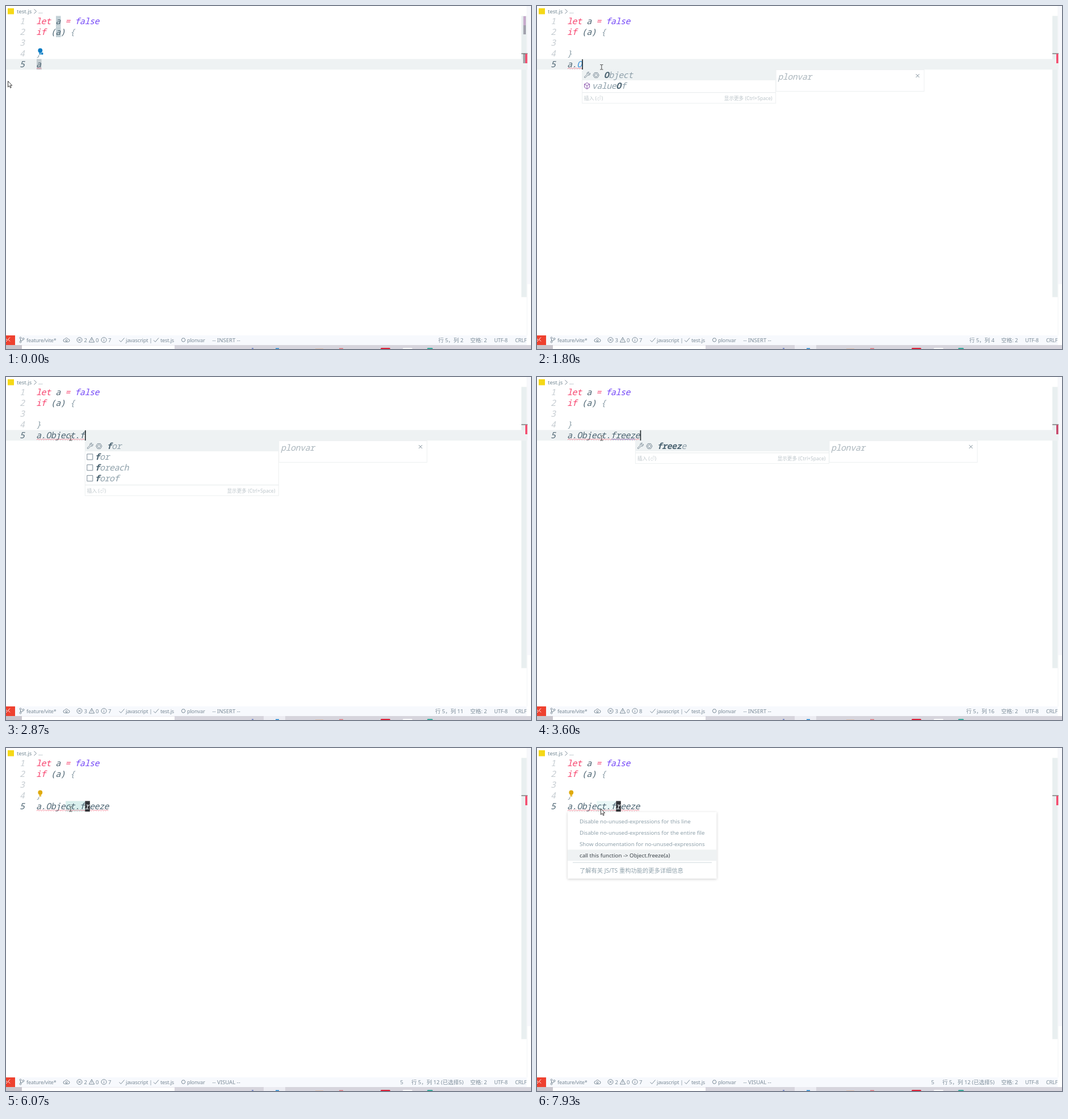
An HTML page for the animation above (8000 ms loop, 925 by 605 pixels).

```html
<!DOCTYPE html>
<html lang="zh">
<head>
<meta charset="utf-8">
<title>Editor quick fix</title>
<style>
html, body { margin: 0; width: 100%; height: 100%; overflow: hidden; background: #fff; }
svg { display: block; width: 925px; height: 605px; }
text { white-space: pre; fill: #8fa1ab; font: 9.5px "Noto Sans", "Noto Sans CJK SC", "Noto Sans CJK", sans-serif; }
.code { font: italic 15px "Noto Sans Mono", "DejaVu Sans Mono", monospace; letter-spacing: -.47px; fill: #4c6472; }
.kw { fill: #f7456f; }
.lit { fill: #7447f7; }
.dim { fill: #8fa1ab; }
.prop { fill: #3490dc; }
.bold { font-weight: 700; fill: #4c6472; }
.num { fill: #c6cdd2; }
.crumb { fill: #738893; }
.bar { fill: #7b8b97; font-size: 9.2px; letter-spacing: -.2px; }
.wide { fill: #7b8b97; }
.foot { font-size: 8.6px; fill: #bcc5ca; }
.menu { font-size: 9.68px; }
.line { fill: none; stroke: #7b8b97; stroke-width: 1; }
.shadow { filter: drop-shadow(0 1px 2px #0003); }
</style>
</head>
<body>
<svg viewBox="0 0 925 605">
  <!-- breadcrumb, scroll ruler and window edge -->
  <rect x="3" y="4" width="11" height="10.5" fill="#f5d816"/>
  <text class="crumb" x="19" y="13">test.js</text>
  <path class="line" d="M49.5 5.5l4 4-4 4"/>
  <text class="crumb" x="57" y="13">...</text>
  <rect x="908" y="17.5" width="9.5" height="496" fill="#e9eff0"/>
  <rect x="918.5" width="6.5" height="490.5" fill="#f7f8fc"/>
  <path d="M918 0V581" stroke="#eff1f4" stroke-width=".8"/>

  <g id="live"></g>

  <!-- status bar -->
  <rect y="581" width="925" height="17" fill="#f7f9fd"/>
  <rect y="581" width="16" height="17" fill="#ee412f"/>
  <path d="M-1 586l3.5 3.5-3.5 3.5M7 584.5l-3.5 3.5 3.5 3.5" fill="none" stroke="#fff"/>
  <g class="line">
    <circle cx="25.5" cy="585.5" r="1.5"/><circle cx="25.5" cy="592.5" r="1.5"/><circle cx="30.5" cy="587" r="1.5"/>
    <path d="M25.5 587v4M30.5 588.5q0 2-5 2"/>
    <path d="M103.5 592.5a2.5 2.5 0 0 1 0-5q3-4 6 0a2.5 2.5 0 0 1 0 5z"/><circle cx="106.5" cy="590" r="1.5"/>
    <circle cx="129.5" cy="589" r="4.5"/><path d="M127.5 587l4 4m0-4l-4 4"/>
    <path d="M151 584.5l4.7 8.5h-9.4zM151 587.5v3"/>
    <circle cx="172.5" cy="589" r="4.5"/><path d="M172.5 588.5v3m0-5v1"/>
    <path d="M199.5 589.5l3 3 6-7M260 589.5l3 3 6-7"/>
    <path d="M310.8 586h3.5l1.7 3-1.7 3h-3.5l-1.7-3z"/>
  </g>
  <text class="bar" x="36" y="592.5">feature/vite*</text>
  <text class="wide" x="158" y="592.5">0</text>
  <text class="bar" x="211" y="592.5">javascript |</text>
  <text class="bar" x="272" y="592.5">test.js</text>
  <text class="bar" x="319" y="592.5">plonvar</text>
  <text class="wide" x="818" y="592.5">空格: 2</text>
  <text class="bar" x="860" y="592.5">UTF-8</text>
  <text class="bar" x="897" y="592.5">CRLF</text>
  <rect x="917.5" y="581" width="7.5" height="17" fill="#fff"/>
  <g id="status"></g>

  <!-- top edge of the taskbar -->
  <rect y="598" width="925" height="7" fill="#d7d5dd"/>
  <rect y="598" width="28" height="7" fill="#c9c6cd"/>
  <rect x="28" y="598.5" width="269" height="6.5" fill="#fff"/>
  <rect id="focus" x="454" y="598" width="38" height="7" fill="#ececf2"/>
  <rect x="433" y="603" width="3" height="2" fill="#8090c8"/>
  <rect x="475" y="603.5" width="6" height="1.5" fill="#2389d4"/>
  <rect x="545" y="604" width="14" height="1" fill="#dcc0ae"/>
  <rect x="587" y="603.5" width="7" height="1.5" fill="#e0767d"/>
  <rect x="660" y="603" width="17" height="4" rx="1.5" fill="#dc1e36"/>
  <rect x="699" y="603" width="17" height="4" rx="1.5" fill="#fafafa"/>
  <rect x="742" y="603" width="10" height="4" rx="1.5" fill="#36aa9b"/>

  <path id="arrow" d="M.5.5v10.5l2.4-2.2 1.7 3.7 1.6-.7-1.7-3.6h3.2z" fill="#fff" stroke="#222" stroke-width=".9"/>
  <path id="beam" d="M111.2 103.5h1.8l.8.5.8-.5h1.8M113.8 104v7.5M111.2 112h1.8l.8-.5.8.5h1.8" fill="none" stroke="#333" stroke-width=".9"/>
</svg>
<script>
const LOOP = 8000, LEFT = 54, CW = 8.53, PITCH = 18.9;
const $ = id => document.getElementById(id);
const colX = n => LEFT + (n - 1) * CW;
const rect = (x, y, w, h, fill, more = '') => `<rect x="${x}" y="${y}" width="${w}" height="${h}" fill="${fill}" ${more}/>`;
const text = (x, y, s, cls = '', more = '') => `<text x="${x}" y="${y}" class="${cls}" ${more}>${s}</text>`;
// Slanted glyphs lean right, so code starts slightly left of its cell.
const code = (x, y, s, cls = '', more = '') => text(x - .9, y, s, 'code ' + cls, more);
const span = (cls, s) => `<tspan class="${cls}">${s}</tspan>`;
const path = (d, more = 'class="line"') => `<path d="${d}" ${more}/>`;

// A suggestion row: icon kind, label, bold range.
const row = (kind, label, from, to) => ({ kind, label, from, to });
const ai = (label, n) => row('ai', label, 0, n);
const snippet = label => row('snippet', label, 0, 1);
const method = n => row('method', 'valueOf', n ? 5 : 0, n ? 6 : 0);

// Each entry changes part of the state at its time.
const steps = [
  [0, { code: 'a', col: 2, mode: 'INSERT', errors: 2, infos: 7, marks: true, bulb: 'blue', rows: null, focus: false, caret: false, picked: 0, menu: false, fresh: false, spell: false }],
  [530, { focus: true }],
  [800, { caret: true }],
  [1270, { code: 'a.', col: 3, marks: false, bulb: null }],
  [1400, { rows: [method(0)] }],
  [1530, { errors: 3 }],
  [1800, { code: 'a.O', col: 4, rows: [ai('Object', 1), method(1)], fresh: true }],
  [1930, { code: 'a.Ob', col: 5, rows: [ai('Object', 2)] }],
  [2070, { code: 'a.Obj', col: 6, rows: [ai('Object', 3)], fresh: false }],
  [2200, { code: 'a.Obje', col: 7, rows: [ai('Object', 4)] }],
  [2330, { code: 'a.Objec', col: 8, rows: [ai('Object', 5)] }],
  [2470, { code: 'a.Object', col: 9, rows: null }],
  [2670, { code: 'a.Object.', col: 10 }],
  [2800, { code: 'a.Object.f', col: 11, rows: [ai('for', 1), snippet('for'), snippet('foreach'), snippet('forof')] }],
  [3000, { code: 'a.Object.fr', col: 12, rows: [ai('freeze', 2)] }],
  [3130, { code: 'a.Object.fre', col: 13, rows: [ai('freeze', 3)] }],
  [3270, { code: 'a.Object.free', col: 14, rows: [ai('freeze', 4)] }],
  [3400, { code: 'a.Object.freez', col: 15, rows: [ai('freeze', 5)] }],
  [3530, { code: 'a.Object.freeze', col: 16, popCol: 15 }],
  [3600, { infos: 8, spell: true }],
  [3930, { rows: null }],
  [4000, { errors: 2, infos: 7, spell: false }],
  [4070, { bulb: 'yellow' }],
  [4270, { mode: 'NORMAL', col: 15 }],
  [4470, { col: 14, bulb: null }],
  [4530, { bulb: 'yellow' }],
  [4800, { col: 13 }],
  [4870, { col: 11 }],
  [4930, { col: 9 }],
  [5200, { col: 8 }],
  [5400, { col: 7 }],
  [5600, { mode: 'VISUAL', picked: 1 }],
  [5730, { col: 8, picked: 2 }],
  [5800, { col: 9, picked: 3 }],
  [6000, { col: 10, picked: 4 }],
  [6070, { col: 11, picked: 5 }],
  [7270, { menu: true }]
];

function wave(x1, x2, color) {
  let d = `M${x1} 111`;
  for (let x = x1, up = true; x < x2 - 2; x += 2.1, up = !up) d += `l2.1 ${up ? -2 : 2}`;
  return path(d, `fill="none" stroke="${color}" stroke-width=".8"`);
}

function icon(kind, x, y) {
  if (kind === 'snippet') return path(`M${x - 5} ${y - 5}h10v10h-10z`);
  if (kind === 'method') return path(`M${x} ${y - 5.5}l4.5 2.5v5.5l-4.5 3-4.5-3v-5.5zM${x - 4.5} ${y - 3}l4.5 2.5 4.5-2.5M${x} ${y - .5}v6`, 'fill="none" stroke="#8b55ad"');
  return path(`M${x - 4.5} ${y + 3}l4.5-4.5q-1-4 3.5-4l-2 2.5 1.5 1.5 2.5-2q0 4.5-4 3.5l-4.5 4.5q-2 0-1.5-1.5z`)
    + path(`M${x + 13.5} ${y - 4.5}h5l2.7 4.5-2.7 4.5h-5l-2.7-4.5z`)
    + path(`M${x + 14.5} ${y - 2.3}h3l1.5 2.3-1.5 2.3h-3l-1.5-2.3z`);
}

function popup(x, rows) {
  const top = 112.5, sep = top + PITCH * rows.length + 2.4, bottom = sep + 18.8;
  let s = rect(x, top, 341, bottom - top, '#fff', 'stroke="#edf0f1"') + rect(x, 112.2, 341, PITCH, '#eef2f3');
  rows.forEach(({ kind, label, from, to }, i) => {
    const y = 122 + i * PITCH;
    s += icon(kind, x + 8.5, y);
    s += code(x + (kind === 'ai' ? 39 : 18), y + 5, label.slice(0, from) + span('bold', label.slice(from, to)) + label.slice(to), 'dim');
  });
  s += path(`M${x} ${sep}h341`, 'stroke="#e6eaec"');
  s += text(x + 3.5, sep + 13, '插入 (⏎)', 'foot') + text(x + 335, sep + 13, '显示更多 (Ctrl+Space)', 'foot', 'text-anchor="end"');
  s += rect(x + 341.5, top, 261, 38, '#fff', 'stroke="#edf0f1"');
  s += code(x + 345.5, 130, 'plonvar', '', 'style="fill:#abb6bd"');
  return s + path(`M${x + 588} 120l6 6m0-6l-6 6`);
}

function bulb(color) {
  const fill = color === 'blue' ? '#0b7cc4' : '#dfaa0c';
  const plus = color === 'blue' ? '<circle cx="63.7" cy="84" r="2.2" fill="#0b7cc4" stroke="#fff" stroke-width=".6"/>' : '';
  return rect(54, 74, 14, 12.5, '#fff') + `<circle cx="60.3" cy="78.5" r="3.9" fill="${fill}"/>`
    + rect(58.5, 81.5, 3.6, 3.9, fill) + path('M58.5 83.3h3.6', 'stroke="#fff" stroke-width=".5"') + plus;
}

function menu() {
  const items = ['Disable no-unused-expressions for this line', 'Disable no-unused-expressions for the entire file',
    'Show documentation for no-unused-expressions', 'call this function -&gt; Object.freeze(a)'];
  return rect(54, 113, 262.5, 117.5, '#fff', 'class="shadow"') + rect(54, 179.3, 262.5, 19.7, '#eff2f3')
    + items.map((s, i) => text(75, 132.8 + i * 20.2, s, 'menu', i === 3 ? 'style="fill:#3c444a"' : '')).join('')
    + path('M63 202H308', 'stroke="#cfd8dc"')
    + text(75, 219.8, '了解有关 JS/TS 重构功能的更多详细信息', '', 'style="font-size:10.25px"');
}

function lineNumbers() {
  return [1, 2, 3, 4, 5].map((n, i) => code(25, 32.4 + i * PITCH, n, n < 5 ? 'num' : '')).join('');
}

function editor(st) {
  const end = colX(st.code.length + 1), insert = st.mode === 'INSERT';
  let s = st.picked ? '' : rect(0, 93.5, 919, 18.7, '#eef2f3');
  s += lineNumbers();
  if (st.marks) {
    s += rect(88, 17.5, 8.5, 19, '#c3d1d7') + rect(88, 36.5, 8.5, 18.5, '#c3d1d7') + rect(54, 93.5, 8.5, 18.7, '#c3ccd0');
    s += rect(911.5, 18, 4.5, 16, '#c6aacb') + rect(911.5, 34, 4.5, 16, '#a1a1ad') + rect(911, 84, 4, 17, '#a3a6ab');
  }
  if (st.picked) s += rect(colX(st.col - st.picked + 1), 93.5, CW * (st.picked - 1), 18.7, st.menu ? '#eaf7f6' : '#d9efed');
  s += path('M908 84h11', 'stroke="#444"');
  s += rect(915, 84.5, 3.5, 16.5, st.spell ? '#c74669' : '#f44a6c');
  s += code(LEFT, 32.4, span('kw', 'let') + ' a ' + span('kw', '=') + ' ' + span('lit', 'false'));
  s += code(LEFT, 51.3, span('kw', 'if') + ' (a) ' + span('dim', '{'));
  s += code(LEFT, 89.1, '}', 'dim');
  s += code(LEFT, 108, st.fresh ? 'a.' + span('prop', st.code.slice(2)) : st.code);
  s += wave(LEFT, end, '#f0667c');
  if (st.spell) s += wave(colX(10), colX(15), '#5a7fd0');
  if (st.bulb) s += bulb(st.bulb);
  if (!insert) {
    s += rect(colX(st.col), 93.5, 8.5, 18.7, '#333539');
    s += code(colX(st.col), 108, st.code[st.col - 1], '', 'style="fill:#dfe5e8"');
  } else if (st.caret) s += rect(colX(st.col) - .3, 94, 1.6, 18, '#20282c');
  if (st.rows) s += popup(colX(st.popCol || st.col), st.rows);
  return s + (st.menu ? menu() : '');
}

function status(st) {
  const y = 592.5;
  const place = st.picked ? `行 5，列 ${st.col + 1} (已选择${st.picked})` : `行 5，列 ${st.col}`;
  return text(137.5, y, st.errors, 'wide') + text(180, y, st.infos, 'wide') + text(363.5, y, `-- ${st.mode} --`, 'wide')
    + (st.picked ? text(694.5, y, st.picked, 'wide') : '') + text(806, y, place, 'wide', 'text-anchor="end"');
}

function pointer(t) {
  const p = Math.min(1, Math.max(0, (t - 70) / 730)), e = p * p * (3 - 2 * p);
  const arrow = p < 1 || t >= 7270;
  const x = t >= 7270 ? 112 : 3 + 109 * e, y = t >= 7270 ? 106.5 : 132 - 26 * e;
  $('arrow').setAttribute('transform', `translate(${x} ${y})`);
  $('arrow').style.display = arrow ? '' : 'none';
  $('beam').style.display = arrow ? 'none' : '';
}

let shown = -1;
const start = performance.now();
function draw() {
  const t = (performance.now() - start) % LOOP;
  const count = steps.filter(([at]) => at <= t).length;
  if (count !== shown) {
    shown = count;
    const st = Object.assign({}, ...steps.slice(0, count).map(([, change]) => change));
    $('live').innerHTML = editor(st);
    $('status').innerHTML = status(st);
    $('focus').style.display = st.focus ? '' : 'none';
  }
  pointer(t);
  requestAnimationFrame(draw);
}
draw();
</script>
</body>
</html>
```
